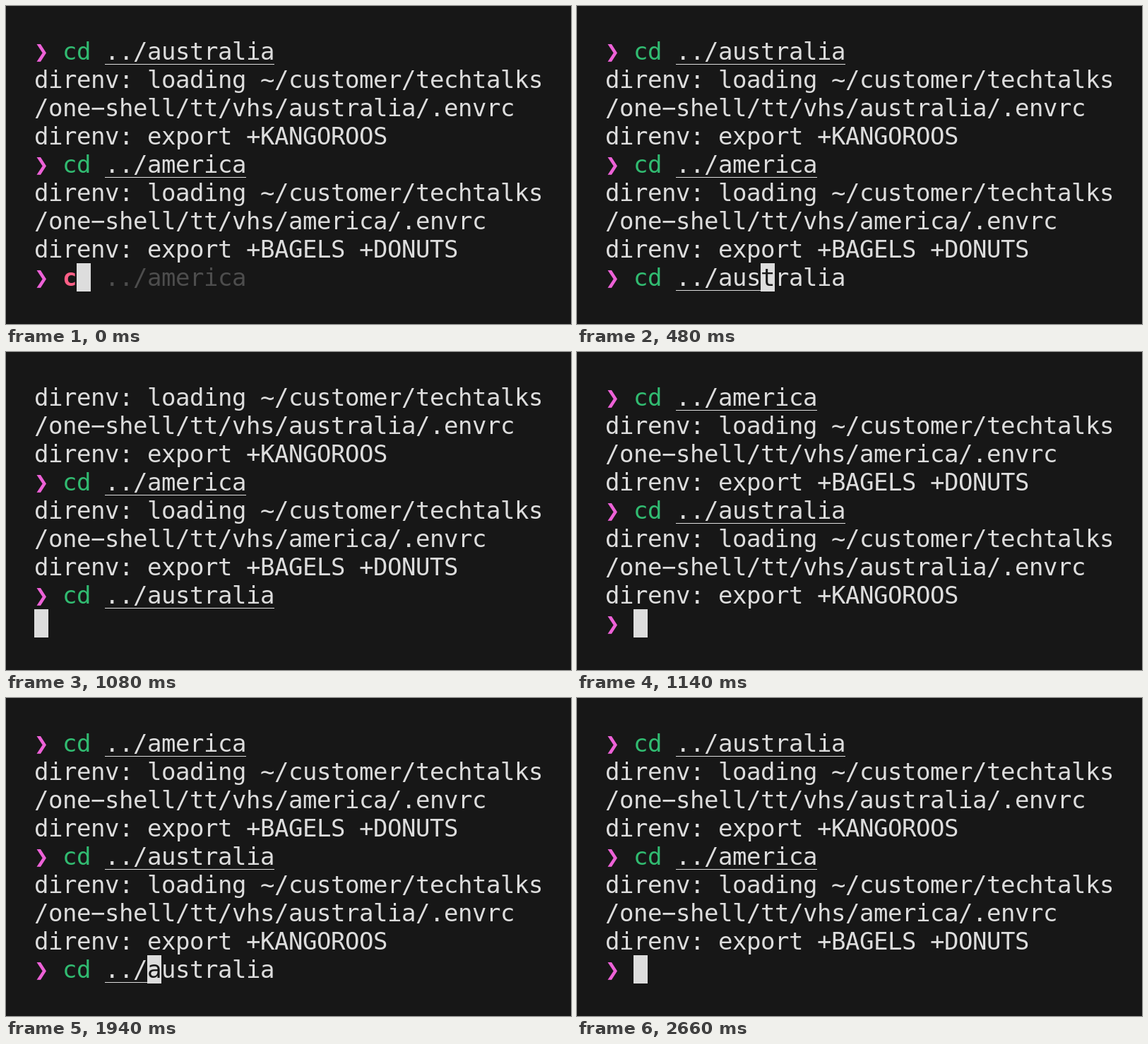
An HTML page with a canvas for the animation above (3140 ms loop, 800 by 450 pixels).

```html
<!DOCTYPE html>
<html lang="en">
<head>
<meta charset="utf-8">
<title>Terminal</title>
<style>
  html, body { margin: 0; width: 100%; height: 100%; overflow: hidden; background: #171717; }
  canvas { display: block; }
</style>
</head>
<body>
<canvas id="screen" width="800" height="450"></canvas>
<script>
const ctx = document.getElementById('screen').getContext('2d');
const LOOP = 3140, TICK = 20;
const CELL_W = 20, CELL_H = 40, LEFT = 40, TOP = 44, ROWS = 9;
const FONT = '34px "DejaVu Sans Mono", monospace';
const BG = '#171717', FG = '#dddddd', GREEN = '#31bb71', PINK = '#ed61d7',
      RED = '#fe5f86', GREY = '#4d4d4d';

const exportsOf = { australia: '+KANGOROOS', america: '+BAGELS +DONUTS' };

// Key presses are in ticks after start; output holds the times of newline, loading, export.
const visits = [
  { dir: 'australia', from: 'america', start: 0, slowHint: true,
    keys: [0, 3, 6, 9, 12, 15, 18, 21, 24, 26, 29, 32, 35, 39, 42],
    output: [1080, 1120, 1120] },
  { dir: 'america', from: 'australia', start: 1640, slowHint: false,
    keys: [0, 3, 6, 9, 12, 15, 17, 20, 23, 27, 30, 33, 35],
    output: [2600, 2620, 2640] }
];

const span = (text, color = FG, opts = {}) => ({ text, color, ...opts });

function commandRow(typed) {
  const row = [span('❯ ', PINK)];
  if (typed.length === 1) row.push(span(typed, RED, { bold: true }));
  else row.push(span(typed.slice(0, 2), GREEN), span(typed.slice(2, 3)),
                span(typed.slice(3), FG, { underline: true }));
  return row;
}

const loadingRows = dir => [
  [span('direnv: loading ~/customer/techtalks')],
  [span(`/one-shell/tt/vhs/${dir}/.envrc`)]
];
const exportRow = dir => [span('direnv: export ' + exportsOf[dir])];
const visitRows = dir => [commandRow('cd ../' + dir), ...loadingRows(dir), exportRow(dir)];

function promptRow(visit, s) {
  const command = 'cd ../' + visit.dir, recent = 'cd ../' + visit.from;
  const n = visit.keys.filter(k => k * TICK <= s).length;
  const typed = command.slice(0, n);
  const row = commandRow(typed);
  const age = n ? s - visit.keys[n - 1] * TICK : 0;
  const changed = n === 8;               // the older suggestion no longer fits
  let hint = n ? (recent.startsWith(typed) ? recent : command).slice(n) : '';
  if (changed && visit.slowHint && age < TICK) hint = '';
  row.push(span(hint, n === 1 || changed ? GREY : FG));
  const blank = n === 1 ? age < TICK : changed && visit.slowHint && age < 2 * TICK;
  return { row, col: 2 + n, under: blank ? '' : hint.slice(0, 1) };
}

function glyph(ch, col, y, color, bold) {
  ctx.font = (bold ? 'bold ' : '') + FONT;
  ctx.fillStyle = color;
  // the long minus serves as hyphen
  ctx.fillText(ch === '-' ? '−' : ch, LEFT + col * CELL_W, y + 32);
}

function drawRow(row, y) {
  let col = 0;
  for (const { text, color, bold, underline } of row) {
    if (underline) {
      ctx.fillStyle = color;
      ctx.fillRect(LEFT + col * CELL_W, y + 38, text.length * CELL_W, 1);
    }
    for (const ch of text) glyph(ch, col++, y, color, bold);
  }
}

function draw(t) {
  const visit = t >= 1140 && t < 2660 ? visits[1] : visits[0];
  const s = t >= 2660 ? t - LOOP : t - visit.start;
  const rows = [...visitRows(visit.dir), ...visitRows(visit.from)];
  const [newline, loading, exported] = visit.output;
  let col = 0, under = '';

  if (s >= 0 && t >= newline) {
    rows.push(commandRow('cd ../' + visit.dir));
    if (t >= loading) rows.push(...loadingRows(visit.dir));
    if (t >= exported) rows.push(exportRow(visit.dir));
    rows.push([]);
  } else {
    const prompt = promptRow(visit, s);
    rows.push(prompt.row);
    ({ col, under } = prompt);
  }

  ctx.fillStyle = BG;
  ctx.fillRect(0, 0, 800, 450);
  rows.slice(-ROWS).forEach((row, i) => drawRow(row, TOP + i * CELL_H));

  const y = TOP + (ROWS - 1) * CELL_H;
  ctx.fillStyle = FG;
  ctx.fillRect(LEFT + col * CELL_W, y, CELL_W, CELL_H);
  glyph(under, col, y, BG);
}

const begin = performance.now();
function frame() {
  draw((performance.now() - begin) % LOOP);
  requestAnimationFrame(frame);
}
frame();
</script>
</body>
</html>
```
